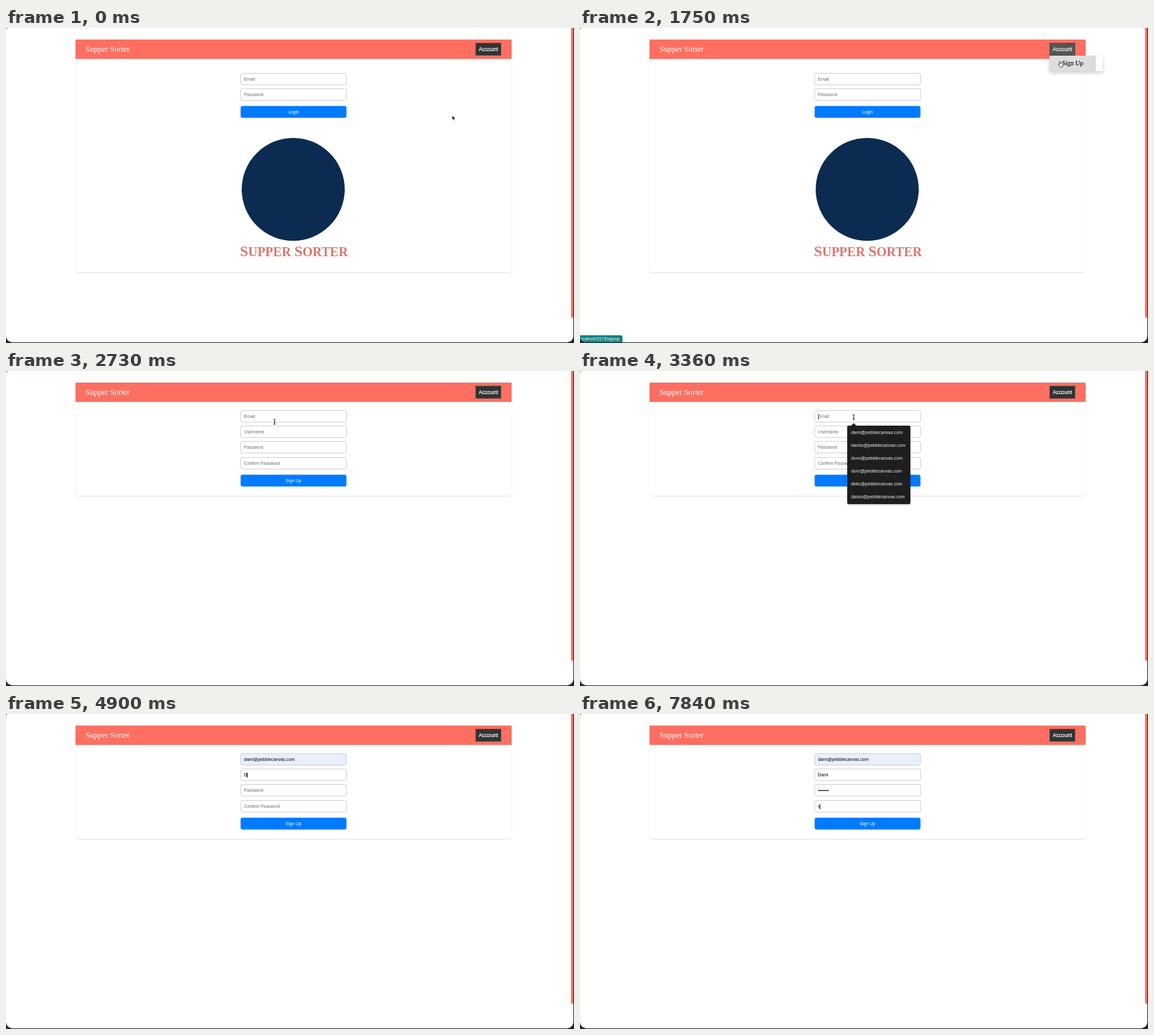
Recreate the animation shown at these times as an HTML page. Size 882x490 px, loop 8000 ms.

```html
<!DOCTYPE html>
<html lang="en">
<head>
<meta charset="utf-8">
<title>Supper Sorter</title>
<style>
html, body { margin: 0; width: 100%; height: 100%; overflow: hidden; background: #25262a; }
body, body * { position: absolute; box-sizing: border-box; white-space: pre; }
[hidden] { display: none !important; }
body { font: 6.84px "Liberation Sans", Arial, sans-serif; }
b, i { position: static !important; }
#window { left: 0; top: 0; width: 881px; height: 489px; background: #fff; border-radius: 3px 3px 10px 10px; overflow: hidden; }
#scroll { left: 877px; top: 0; width: 4px; height: 451px; background: #f56e62; border-left: 1px solid #f8a49c; border-radius: 0 0 3px 3px; }
.card { left: 108px; top: 18px; width: 677px; border-radius: 4px; box-shadow: 0 .5px 1.5px rgba(0, 0, 0, .2); }
#header { left: 108px; top: 18px; width: 677px; height: 30px; background: #ff6f61; border: 1px solid #e9776c; box-shadow: 0 1px 2px rgba(0, 0, 0, .1); }
#brand { left: 14.5px; top: -1px; font: 12.4px/30px "Liberation Serif", Times, serif; color: #fff; }
#account { left: 729px; top: 23px; width: 40px; height: 20px; background: #333; border: 1px solid #594746; color: #fff; font-size: 8.3px; line-height: 18px; text-align: center; -webkit-text-stroke: .2px #fff; }
#account.open { background: #555; }
#menu { left: 729px; top: 43px; width: 83px; height: 24px; background: #fefefe; box-shadow: 0 3px 6px rgba(0, 0, 0, .2); }
#item { width: 72px; height: 24px; font: 10px/24px "Liberation Serif", Times, serif; text-align: center; -webkit-text-stroke: .1px #000; }
#item.hover { background: #ddd; }
.field { left: 256px; width: 165px; height: 19px; padding-left: 4.5px; border: 1px solid #d0d0d0; border-radius: 3px; line-height: 17px; color: #000; }
.field.empty { color: #6c6c6c; }
.field.filled { background: #e8f0fe; }
.field i { display: inline-block; width: .8px; height: 8px; margin-right: -.8px; background: #000; vertical-align: middle; }
.button { left: 256px; width: 165px; height: 19px; background: #007bff; border: 1px solid #55a5fa; border-radius: 3px; color: #fff; line-height: 17px; text-align: center; }
#plate { left: 258px; top: 153px; width: 160px; height: 160px; border-radius: 50%; background: #0b2b50; }
#wordmark { left: 239px; width: 200px; top: 317px; font: bold 20px/26px "Liberation Serif", Times, serif; color: #db766c; text-align: center; }
#wordmark b { font-size: 23px; }
#popup { left: 415px; top: 85px; width: 98px; padding: 1px 6px; background: #1e1e1e; border-radius: 2px; color: #eee; font-size: 6.95px; line-height: 20px; box-shadow: 0 1px 3px rgba(0, 0, 0, .3); }
#popup::before { content: ""; position: absolute; left: 6px; top: -4px; border: 4px solid transparent; border-top: 0; border-bottom-color: #1e1e1e; }
#status { left: 0; bottom: 0; height: 11px; padding-right: 4px; text-indent: -1.4px; background: #108184; color: #fff; font-size: 6.5px; line-height: 11px; border-radius: 0 3px 0 0; overflow: hidden; }
#cursor { left: 0; top: 0; width: 882px; height: 490px; }
</style>
</head>
<body>
<div id="window">
  <div id="login" class="card" style="height:362px">
    <div id="plate"></div>
    <div id="wordmark"><b>S</b>UPPER <b>S</b>ORTER</div>
  </div>
  <div id="signup" class="card" style="height:176px"></div>
  <div id="header"><div id="brand">Supper Sorter</div></div>
  <div id="account">Account</div>
  <div id="menu"><div id="item"></div></div>
  <div id="popup"></div>
  <div id="scroll"></div>
  <div id="status"></div>
</div>
<svg id="cursor"><g id="pointer" stroke-linejoin="round">
  <path id="arrow" d="M0 0V7L1.6 5.6L2.6 8L3.8 7.5L2.8 5.2H4.9Z" stroke="#fff" stroke-width=".6"/>
  <path id="hand" d="M-.7 .6Q0 -.5 .7 .6V3L4.2 3.6Q5 3.9 4.9 5L4.2 8.6H.3L-2.3 5.6Q-2.5 4.5 -1.4 4.8L-.7 5.4Z" fill="#fff" stroke="#111" stroke-width=".7"/>
  <path id="beam" d="M-1.8 -4Q0 -4 0 -3Q0 -4 1.8 -4M0 -3V3M-1.8 4Q0 4 0 3Q0 4 1.8 4M-1 1H1" fill="none" stroke="#111" stroke-width=".9"/>
</g></svg>
<script>
const LOOP = 8000;
const $ = id => document.getElementById(id);

function add(parent, className, top, text) {
  const el = document.createElement('div');
  el.className = className;
  el.style.top = top + 'px';
  el.textContent = text;
  parent.append(el);
  return el;
}

// Positions inside a card, whose top edge is at y = 18.
['Email', 'Password'].forEach((label, i) => add($('login'), 'field empty', 52 + i * 24.4, label));
add($('login'), 'button', 103, 'Login');
const labels = ['Email', 'Username', 'Password', 'Confirm Password'];
const fields = labels.map((label, i) => add($('signup'), 'field', 42.8 + i * 24.3, label));
add($('signup'), 'button', 142.5, 'Sign Up');

const address = name => name + '@pebblecanvas.com';
const suggestions = ['dami', 'damtu', 'duvo', 'dorri', 'dellu', 'dasko'].map(address);

// Key press times for each field, and the times at which focus moves on.
const typed = ['dami', 'Dami', '•••••••', '•'];
const presses = [
  [3430, 3570, 3640, 3850],
  [4900, 5040, 5320, 5460],
  [5880, 6020, 6160, 6580, 6720, 7000, 7140],
  [7840]
];
const focusTimes = [3360, 4340, 5600, 7420];
const fillTime = 3990;

const path = [
  [70, 693, 136], [840, 741.5, 26], [910, 741.5, 26], [1680, 745, 52],
  [2240, 745, 52], [2660, 417, 79], [2800, 417, 79], [3010, 425, 72]
];

function pointerAt(t) {
  const next = path.findIndex(p => p[0] > t);
  if (next < 1) return path[next ? path.length - 1 : 0].slice(1);
  const [a, b] = [path[next - 1], path[next]];
  const u = (t - a[0]) / (b[0] - a[0]);
  const ease = u * u * (3 - 2 * u);
  return [1, 2].map(k => a[k] + (b[k] - a[k]) * ease);
}

const valueAt = (i, t) => i === 0 && t >= fillTime
  ? address(typed[0])
  : typed[i].slice(0, presses[i].filter(p => p <= t).length);

function render(t) {
  const onLogin = t < 1890;
  $('login').hidden = !onLogin;
  $('signup').hidden = onLogin;

  const [x, y] = pointerAt(t);
  const open = x >= 729 && y < 67;
  $('account').className = open ? 'open' : '';
  $('menu').hidden = !open;
  $('item').textContent = onLogin ? 'Sign Up' : 'Sign In';
  $('item').className = y > 43 ? 'hover' : '';
  $('status').hidden = t < 1750 || t >= 2380;
  $('status').textContent = 'localhost:5173/' + (onLogin ? 'signup' : 'login');

  const focus = focusTimes.filter(f => f <= t).length - 1;
  fields.forEach((field, i) => {
    const value = valueAt(i, t);
    const caret = i === focus ? '<i></i>' : '';
    field.innerHTML = value ? value + caret : caret + labels[i];
    field.className = 'field' + (value ? '' : ' empty') + (i === 0 && t >= fillTime ? ' filled' : '');
  });

  $('popup').hidden = focus !== 0 || t >= fillTime;
  const prefix = valueAt(0, t);
  const matches = suggestions.filter(s => s.startsWith(prefix));
  $('popup').textContent = matches.join('\n');

  const shape = open ? 'hand' : t > 2600 ? 'beam' : 'arrow';
  for (const id of ['arrow', 'hand', 'beam']) $(id).style.display = id === shape ? '' : 'none';
  $('pointer').setAttribute('transform', `translate(${x} ${y})`);
  $('pointer').style.display = t < presses[0][0] ? '' : 'none';
}

const start = performance.now();
(function tick() {
  render((performance.now() - start) % LOOP);
  requestAnimationFrame(tick);
})();
</script>
</body>
</html>
```
